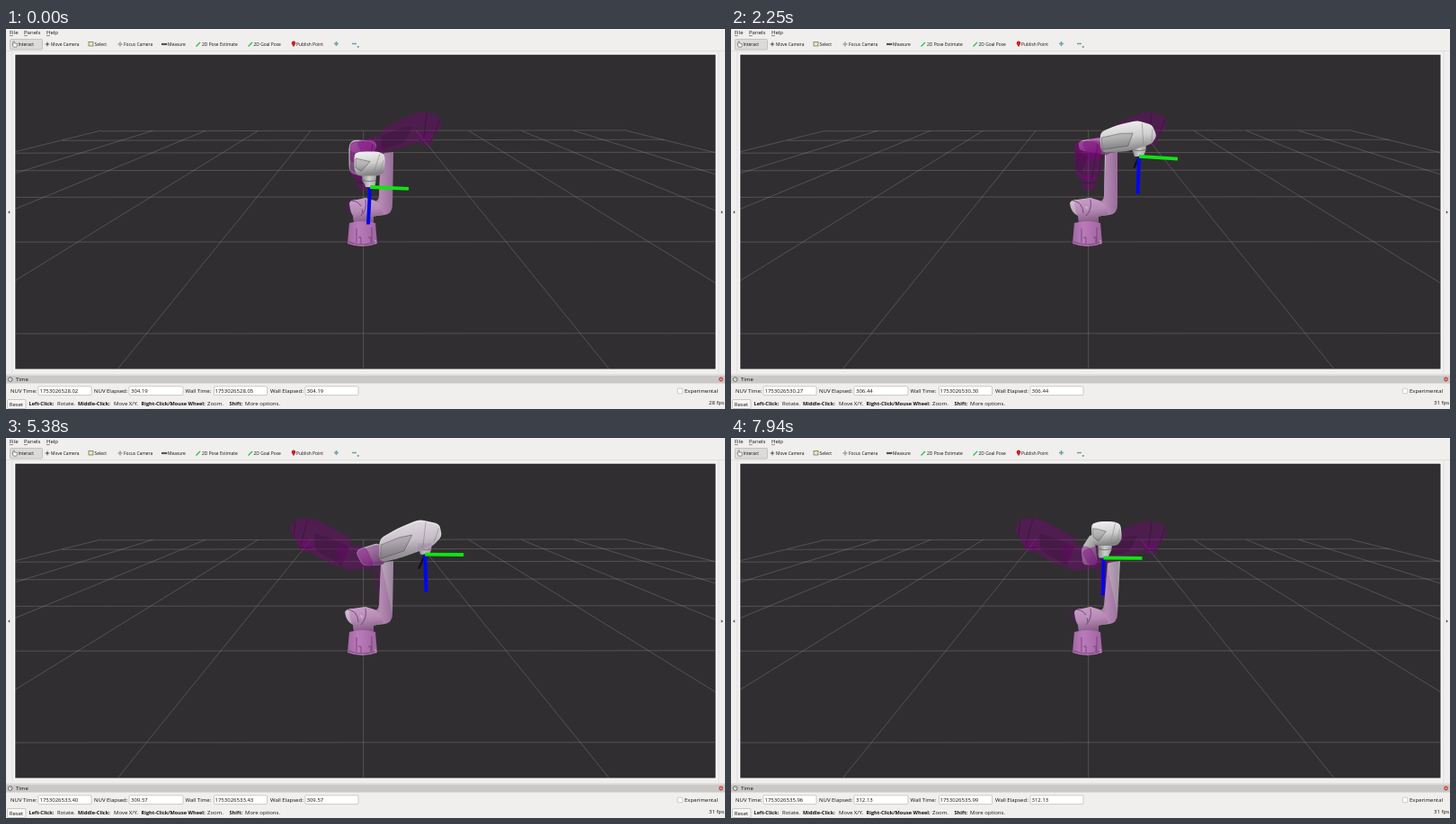
Animation of 800 by 424 pixels, one loop 8000 ms. Source, as an HTML page:

```html
<!DOCTYPE html>
<html lang="en">
<head>
<meta charset="utf-8">
<title>Robot arm viewer</title>
<style>
  html, body { margin: 0; width: 100%; height: 100%; overflow: hidden; background: #f0efee; }
  svg { display: block; width: 100%; height: 100%; }
  text { font-family: "Open Sans", "Noto Sans", sans-serif; font-size: 6px; fill: #111; white-space: pre; }
  .tool { font-size: 4.9px; }
  .bold { font-size: 5.6px; font-weight: 700; }
  .metal { stroke-width: 3; stroke-linejoin: round; }
</style>
</head>
<body>
<svg id="stage" viewBox="0 0 800 424">
  <defs>
    <linearGradient id="steel" x1="0.3" y1="0" x2="0.5" y2="1">
      <stop offset="0" stop-color="#ededed"/><stop offset=".5" stop-color="#cfcfcf"/><stop offset="1" stop-color="#838383"/>
    </linearGradient>
    <linearGradient id="shade" x1="0" y1="0" x2=".7" y2="1">
      <stop offset="0" stop-color="#dadada"/><stop offset="1" stop-color="#707070"/>
    </linearGradient>
    <linearGradient id="tube">
      <stop offset="0" stop-color="#858585"/><stop offset=".5" stop-color="#cecece"/><stop offset="1" stop-color="#a2a2a2"/>
    </linearGradient>
    <linearGradient id="foot">
      <stop offset="0" stop-color="#a267a3"/><stop offset=".35" stop-color="#ba7bba"/><stop offset="1" stop-color="#a065a1"/>
    </linearGradient>
    <clipPath id="view"><rect x="10" y="29.5" width="780" height="350"/></clipPath>
  </defs>

  <rect width="800" height="424" fill="#f0efee"/>
  <rect width="800" height="1" fill="#252c38"/>
  <path d="M0 25.5H800M7 26V385M793 26V385M0 385.5H800" stroke="#dcdad8" fill="none" stroke-width=".7"/>
  <rect x="9" y="28.5" width="782" height="352" fill="#fbfbfb"/>
  <rect x="10.3" y="29.7" width="779.2" height="349.8" fill="#302e31"/>
  <path d="M4.2 203.3v3.4l-2-1.7zM795.8 203.3v3.4l2-1.7z" fill="#444"/>

  <g clip-path="url(#view)">
    <g id="grid" stroke="#a2a198" stroke-opacity=".45" stroke-width=".7"/>
    <g id="lower"></g>
    <g id="ghosts"></g>
    <g id="upper"></g>
  </g>

  <!-- toolbar -->
  <rect x="4.5" y="12.5" width="36" height="11.5" rx="1" fill="#dddbd9" stroke="#b6b3b0" stroke-width=".7"/>
  <path d="M8 15.2v3l-1-.5 1.3 3.4h3.6l.6-3.4-3.2-.7v-1.8z" fill="#fff" stroke="#555" stroke-width=".6"/>
  <path d="M43.5 18h5M46 15.5v5M124.5 18h5M127 15.5v5" stroke="#777" stroke-width="1"/>
  <circle cx="46" cy="18" r="1.2" fill="#666"/>
  <circle cx="127" cy="18" r="1.4" fill="#aaa"/>
  <rect x="92" y="15.5" width="5" height="4.5" fill="#eee8a0" stroke="#667" stroke-width=".7"/>
  <rect x="173" y="16.9" width="6.3" height="2.2" fill="#555"/>
  <path d="M211.5 20.5l4.5-4.5M269.5 20.5l4.5-4.5" stroke="#21c43a" stroke-width="1.3"/>
  <path d="M320 21.3l-2.2-3.8a2.3 2.3 0 1 1 4.4 0z" fill="#c8202c"/>
  <path d="M365 17.5h5M367.5 15v5M385 17.5h5" stroke="#6f9fae" stroke-width="1.6"/>
  <path d="M390.5 20.5h2.6l-1.3 1.5z" fill="#444"/>

  <!-- time panel -->
  <rect y="386.5" width="800" height="9" fill="#cbc9c7"/>
  <circle cx="4.7" cy="391" r="2.3" fill="#fff" stroke="#444" stroke-width=".8"/>
  <path d="M4.7 389.5v1.6h1.2" fill="none" stroke="#444" stroke-width=".5"/>
  <circle cx="795.5" cy="391" r="2.4" fill="#c9433c"/>
  <path d="M794.6 390.1l1.8 1.8M796.4 390.1l-1.8 1.8" stroke="#fff" stroke-width=".6"/>
  <g fill="#fff" stroke="#bab7b4" stroke-width=".7">
    <rect x="36" y="398.8" width="59" height="9.8" rx="1"/><rect x="137" y="398.8" width="60" height="9.8" rx="1"/>
    <rect x="231.5" y="398.8" width="59" height="9.8" rx="1"/><rect x="333" y="398.8" width="59" height="9.8" rx="1"/>
    <rect x="747.3" y="401.2" width="5.5" height="5.5" rx=".8"/>
    <rect x="1.5" y="413.5" width="20.5" height="10" rx="1" fill="#f7f6f5"/>
  </g>
  <g id="labels"></g>
</svg>
<script>
const LOOP = 8000, STEP = 62.55;
const byId = id => document.getElementById(id);

function add(parent, tag, attrs, content) {
  const el = document.createElementNS("http://www.w3.org/2000/svg", tag);
  for (const key in attrs) el.setAttribute(key, attrs[key]);
  if (content) el.textContent = content;
  parent.append(el);
  return el;
}
const label = (x, y, content, cls = "") => add(byId("labels"), "text", { x, y, class: cls }, content);

// Perspective floor
const HORIZON = 42, AXIS = 397.7;
const rowY = n => HORIZON + 572.6 / (1.922 + n);
const colX = (col, y) => AXIS + col * 0.81 * (y - HORIZON);
for (let row = 0; row <= 6; row++) {
  const y = rowY(row);
  add(byId("grid"), "line", { x1: colX(-5, y), x2: colX(5, y), y1: y + .5, y2: y - .5 });
}
for (let col = -5; col <= 5; col++) {
  const far = rowY(6), near = rowY(-1);
  add(byId("grid"), "line", { x1: colX(col, far), y1: far, x2: colX(col, near), y2: near });
}

// Static text
[["File", 4], ["Panels", 20], ["Help", 45]].forEach(([word, x]) => {
  label(x, 7.4, word);
  add(byId("labels"), "path", { d: `M${x} 8.6h3.8`, stroke: "#222", "stroke-width": .5 });
});
[["Interact", 13.5], ["Move Camera", 50], ["Select", 98.5], ["Focus Camera", 131], ["Measure", 180],
 ["2D Pose Estimate", 218], ["2D Goal Pose", 275.5], ["Publish Point", 323]]
  .forEach(([word, x]) => label(x, 19.7, word, "tool"));
label(11, 393.2, "Time");
[["NUV Time:", 5], ["NUV Elapsed:", 98], ["Wall Time:", 199.5], ["Wall Elapsed:", 294], ["Experimental", 755]]
  .forEach(([word, x]) => label(x, 405.9, word));
label(3.7, 420.6, "Reset");
[["Left-Click:", 25.5, "Rotate.", 57], ["Middle-Click:", 80, "Move X/Y.", 120],
 ["Right-Click/Mouse Wheel:", 150.5, "Zoom.", 224], ["Shift:", 248.5, "More options.", 266]]
  .forEach(([key, x, action, ax]) => { label(x, 420.4, key, "bold"); label(ax, 420.4, action); });

// Counters: value at the start, in seconds
const counters = [[37.5, 1753026528.02], [139, 304.187], [232.5, 1753026528.05], [334.5, 304.187]]
  .map(([x, start]) => ({ start, el: label(x, 405.9, "") }));
const fps = label(799, 419, "");
fps.setAttribute("text-anchor", "end");

// Pose: elbow (4 points), forearm (8 points), flange (2 points), then
// green axis drop, blue axis drift, upper arm top x, shoulder left x
const pose = (elbow, forearm, flange, rest) =>
  [elbow, forearm, flange, rest].join(" ").split(/[ ,]+/).map(Number);

const front = pose("383,127 411,125 411,146 383,150",
  "383,129 388,126 406,127 412,134 412,162 408,167 386,167 383,160", "398,167 398,180", "1 0 424 383");
const start = pose("383,126 413,127 398,164 383,160",
  "389,141 395,139 414,139 420,142 420,159 415,163 392,163 389,157", "404,165 405,177", "1.5 -2 424 383");
const rising = pose("384,126 413,122 421,143 385,133",
  "401,124 414,122.5 439,122.5 449,125 451,138 444,145 428,146 401,139", "432,147 433,159", "3.5 -2.5 429 380");
const lifted = pose("388,127 414,123 420,140 389,135",
  "412,117 430,109.5 452,104.5 467.5,109 472,120 467,128 440,136 413,137.5", "454,131 454,143", "2.3 -1.5 423 378");
const right = pose("390,127 416,119 422,141 398,142",
  "417.5,114 438,102.5 461,93 482,98 484.5,110 475,120 440,133 417.5,138", "467,120 467.5,130.5", "0 1.5 424 378");
const turning = pose("394,128 411,117 417,140 395,142",
  "409.5,117 424,105 441,95.5 465,97.5 468.5,108 460,121 437,132 407,137", "449,122 448.5,133.5", "0 0 425 380");
const middle = pose("391,125 402,108 407,141 393,141",
  "402.5,98 410,95.5 425,95.5 432,98 433.5,113 429,119.5 406,119.5 403,113", "416,120 414.5,134.5", "0 -.5 426 383");
const left = pose("366,121 400,122 410,145 376,149",
  "385,114 365,103 342,91 324,91 316,101 321,114 345,132 372,146", "333,118 333,127", "0 0 410 383");

const easeOut = u => 1 - (1 - u) ** 1.6, easeIn = u => u ** 1.6, linear = u => u;
const track = [[0, start, linear], [1250, rising, linear], [2250, lifted, easeOut], [3350, right, linear],
               [5150, right, easeIn], [6380, turning, linear], [7940, middle, linear], [LOOP, middle, linear]];
const SWITCH = 4900;

function poseAt(t) {
  const i = track.findLastIndex(([at]) => at <= t);
  const [t0, from, ease] = track[i], [t1, to] = track[i + 1];
  const u = ease((t - t0) / (t1 - t0));
  return from.map((v, k) => v + (to[k] - v) * u);
}

// Closed outline with softened corners
function outline(p, first, count) {
  const point = i => p.slice(2 * (first + i % count), 2 * (first + i % count) + 2);
  const toward = (a, b) => a.map((v, k) => v + (b[k] - v) * .25).join(" ");
  let d = "";
  for (let i = 0; i < count; i++) {
    const before = point(i + count - 1), corner = point(i), after = point(i + 1);
    d += `${i ? "L" : "M"}${toward(corner, before)}Q${corner.join(" ")} ${toward(corner, after)}`;
  }
  return d + "Z";
}

function shapes(p) {
  const [fx, fy, tx, ty, , , top, knob] = p.slice(24);
  const mix = (a, b, u) => [0, 1].map(k => p[8 + 2 * a + k] * (1 - u) + p[8 + 2 * b + k] * u).join(" ");
  return {
    beam: `M${top - 7} 140L${top + 7} 138 430 196Q430 207 421 208L404 210 402 194Q415 195 415 187Z`,
    turret: `M${knob - 1} 195Q${knob} 191 ${knob + 8} 191L400 189 410 192 416 196 420 207 409 210 409 217H387L386 209Q${knob} 205 ${knob - 1} 195Z`,
    knob: `M${knob + 2} 192Q${knob + 13} 193 ${knob + 14} 206M395 209Q402 202 400 191`,
    elbow: outline(p, 0, 4),
    forearm: outline(p, 4, 8),
    panel: `M${mix(0, 7, .25)}L${mix(1, 6, .3)} ${mix(2, 6, .4)} ${mix(6, 2, .15)} ${mix(7, 0, .1)}Z`,
    seam: `M${mix(2, 3, .35)}L${mix(5, 6, .3)}M${mix(3, 4, .3)}L${mix(4, 5, .8)}`,
    flange: `M${fx - 8} ${fy - 2}H${fx + 8}L${fx + 7.5} ${fy + 5} ${tx + 6} ${ty - 3} ${tx + 5} ${ty}H${tx - 5}L${tx - 6} ${ty - 3} ${fx - 7.5} ${fy + 5}Z`,
    ring: `M${fx - 7.5} ${fy + 4.5}Q${fx} ${fy + 7} ${fx + 7.5} ${fy + 4.5}`
  };
}

const BASE = "M382 217Q397 213 411 217L413 240Q397 246 380 240Z";
const lower = byId("lower"), upper = byId("upper"), ghosts = byId("ghosts");
const solid = (parent, paint) => add(parent, "path", { fill: `url(#${paint})`, stroke: `url(#${paint})`, class: "metal" });
const line = (parent, stroke, width) => add(parent, "path", { fill: "none", stroke, "stroke-width": width });

const arm = {
  beam: add(lower, "path", { fill: "url(#tube)" }),
  turret: add(lower, "path", { fill: "url(#steel)" }),
  knob: line(lower, "#555", .8),
  elbow: solid(lower, "shade"),
  flange: add(upper, "path", { fill: "url(#tube)" }),
  ring: line(upper, "#666", .8),
  forearm: solid(upper, "steel"),
  panel: add(upper, "path", { fill: "#000", "fill-opacity": .14, stroke: "#3a3a3a", "stroke-opacity": .6, "stroke-width": .7 }),
  seam: line(upper, "#8a8a8a", .6)
};
const tint = ["flange", "forearm"].map(name => ({ name, el: add(upper, "path", { fill: "#700c74" }) }));
const axes = { away: line(upper, "#121214", 2.4), blue: line(upper, "#0505f0", 4), green: line(upper, "#0ee60e", 3.8) };

function makeGhost(p, opacity) {
  const g = add(ghosts, "g", { fill: "#800080" });
  const s = shapes(p);
  add(g, "path", { d: s.beam + s.turret, "fill-opacity": .18 });
  for (const name of ["elbow", "forearm", "flange"])
    add(g, "path", { d: s[name], "fill-opacity": opacity, stroke: "#800080", "stroke-opacity": opacity * .5, "stroke-width": 1.6, "stroke-linejoin": "round" });
  add(g, "path", { d: s.panel, fill: "#280a2c", "fill-opacity": .22 });
  add(g, "path", { d: s.seam + s.ring, fill: "none", stroke: "#280a2c", "stroke-opacity": .5, "stroke-width": .8 });
  return g;
}
const ghostRight = makeGhost(right, .36), ghostFront = makeGhost(front, .4), ghostLeft = makeGhost(left, .38);

add(ghosts, "path", { d: BASE, fill: "url(#foot)" });
add(ghosts, "path", { d: "M381 238Q397 244 412 238M390 223v16M407 222v16M392 233h3v7M403 233h3v6", fill: "none", stroke: "#633667", "stroke-width": .7 });
add(ghosts, "path", { d: "M411 236v4M394 199h2v3", fill: "none", stroke: "#f0e4f0", "stroke-opacity": .7, "stroke-width": .8 });

const clamp = u => Math.max(0, Math.min(1, u));

function render(time) {
  const t = Math.floor(time / STEP + .1) * STEP;
  const p = poseAt(Math.min(t, LOOP - 1)), s = shapes(p);
  for (const name in arm) arm[name].setAttribute("d", s[name]);

  // The arm takes on the ghost's colour while both coincide
  const overlap = .38 * clamp((t - 2700) / 600) * (1 - .8 * clamp((t - SWITCH) / 300)) * clamp((5800 - t) / 400);
  for (const { name, el } of tint) {
    el.setAttribute("d", s[name]);
    el.setAttribute("fill-opacity", overlap);
  }

  const [x, y, drop, drift] = p.slice(26);
  axes.green.setAttribute("d", `M${x} ${y}l43 ${drop + .3}`);
  axes.blue.setAttribute("d", `M${x} ${y + 1}l${drift} 40.5`);
  const reach = clamp((x - 414) / 50);
  axes.away.setAttribute("d", `M${x} ${y}l${-7 * reach} ${16 * reach}`);

  ghostFront.style.display = t < SWITCH ? "" : "none";
  ghostLeft.style.display = t < SWITCH ? "none" : "";

  for (const { start, el } of counters) el.textContent = (start + t / 1000).toFixed(2);
  fps.textContent = (t < 800 ? 28 : t > 5900 && t < 6900 ? 27 : 31) + " fps";
}

const began = performance.now();
function tick() {
  render((performance.now() - began) % LOOP);
  requestAnimationFrame(tick);
}
tick();
</script>
</body>
</html>
```
